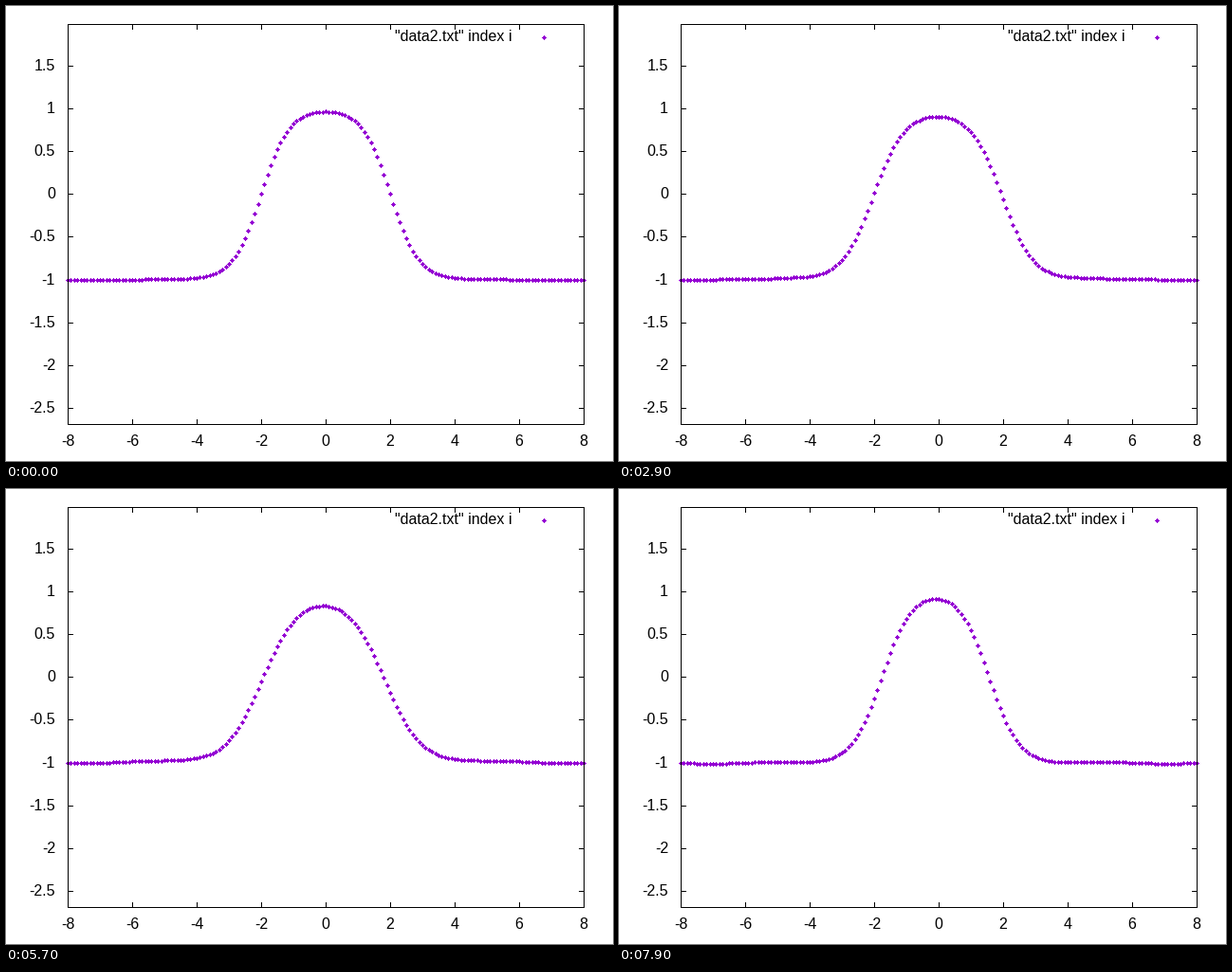
A matplotlib script that plays this animation: 640x480 px, repeating every 8000 ms.

```python
import numpy as np
import matplotlib.pyplot as plt
from matplotlib.animation import FuncAnimation
from matplotlib.collections import PolyCollection

W, H = 640, 480
FRAMES, INTERVAL = 80, 100
LEFT, RIGHT, TOP, BOTTOM = 65, 609, 19, 441
TICK = 5
PURPLE = "#9400D3"

# Kink and antikink of the phi^4 field: u_tt = u_xx + 2u - 2u^3
X = np.linspace(-8, 8, 161)
DX = X[1] - X[0]
STEP, SUB = 0.1, 5
GAMMA = 1 / np.sqrt(1 - 0.5 ** 2)
DRIFT = 0.011


def force(u):
    f = np.zeros_like(u)
    f[1:-1] = (u[2:] - 2 * u[1:-1] + u[:-2]) / DX ** 2
    f[1:-1] += 2 * u[1:-1] * (1 - u[1:-1] ** 2)
    return f


def simulate():
    u = np.tanh(GAMMA * (X + 2)) - np.tanh(GAMMA * (X - 2)) - 1
    v = DRIFT * np.gradient(u, DX)
    v[0] = v[-1] = 0
    dt = STEP / SUB
    states = [u.copy()]
    for _ in range(FRAMES - 1):
        for _ in range(SUB):
            v = v + 0.5 * dt * force(u)
            u = u + dt * v
            v = v + 0.5 * dt * force(u)
        states.append(u.copy())
    return states


def px(x):
    return np.floor(337 + 34 * np.asarray(x) + 0.5)


def py(y):
    return np.floor(198.24 - 90.3 * np.asarray(y) + 0.5)


# Outline of a stepped five-pixel diamond around the pixel at (0, 0)
QUARTER = np.array([(3, 0), (3, 1), (2, 1), (2, 2), (1, 2), (1, 3)], float)


def diamond():
    q = QUARTER - [0, 0]
    a, b = q[:, 0], q[:, 1]
    pts = np.concatenate([
        np.c_[a, b], np.c_[1 - a, b][::-1],
        np.c_[1 - a, 1 - b], np.c_[a, 1 - b][::-1],
    ])
    return pts


DOT = diamond()


def dots(xs, ys):
    centres = np.column_stack([xs, ys])
    return centres[:, None, :] + DOT[None]


def bar(x0, y0, x1, y1):
    """Rectangle covering the pixels from (x0, y0) to (x1, y1) inclusive."""
    return [(x0, y0), (x1 + 1, y0), (x1 + 1, y1 + 1), (x0, y1 + 1)]


fig = plt.figure(figsize=(W / 100, H / 100), dpi=100, facecolor="white")
ax = fig.add_axes([0, 0, 1, 1])
ax.set_xlim(0, W)
ax.set_ylim(H, 0)
ax.axis("off")


def add_shapes(polys, color, z):
    shapes = PolyCollection(polys, facecolors=color, edgecolors="none",
                            linewidths=0, antialiaseds=False, zorder=z)
    ax.add_collection(shapes, autolim=False)
    return shapes


def label(x, y, s, ha):
    ax.text(x, y, s, ha=ha, va="baseline", color="black",
            family="Liberation Sans", fontsize=16 * 72 / 100,
            parse_math=False)


ticks = []
for xv in range(-8, 9, 2):
    x = int(px(xv))
    ticks += [bar(x, TOP, x, TOP + TICK), bar(x, BOTTOM - TICK, x, BOTTOM)]
    label(x, 464, f"{xv}", "center")
for yv in np.arange(-2.5, 1.6, 0.5):
    y = int(py(yv))
    ticks += [bar(LEFT, y, LEFT + TICK, y), bar(RIGHT - TICK, y, RIGHT, y)]
    label(52, y + 5, f"{yv:g}", "right")
add_shapes(ticks, "black", 1)

label(533, 37, '"data2.txt" index i', "right")
add_shapes(dots([567], [33]), PURPLE, 2)

add_shapes([
    bar(LEFT, TOP, RIGHT, TOP), bar(LEFT, BOTTOM, RIGHT, BOTTOM),
    bar(LEFT, TOP, LEFT, BOTTOM), bar(RIGHT, TOP, RIGHT, BOTTOM),
], "black", 3)

states = simulate()
xs = px(X)
curve = add_shapes(dots(xs, py(states[0])), PURPLE, 2)


def update(i):
    curve.set_verts(dots(xs, py(states[i])))
    return (curve,)


anim = FuncAnimation(fig, update, frames=FRAMES, interval=INTERVAL,
                     repeat=True, repeat_delay=0, blit=False)
plt.show()
```
